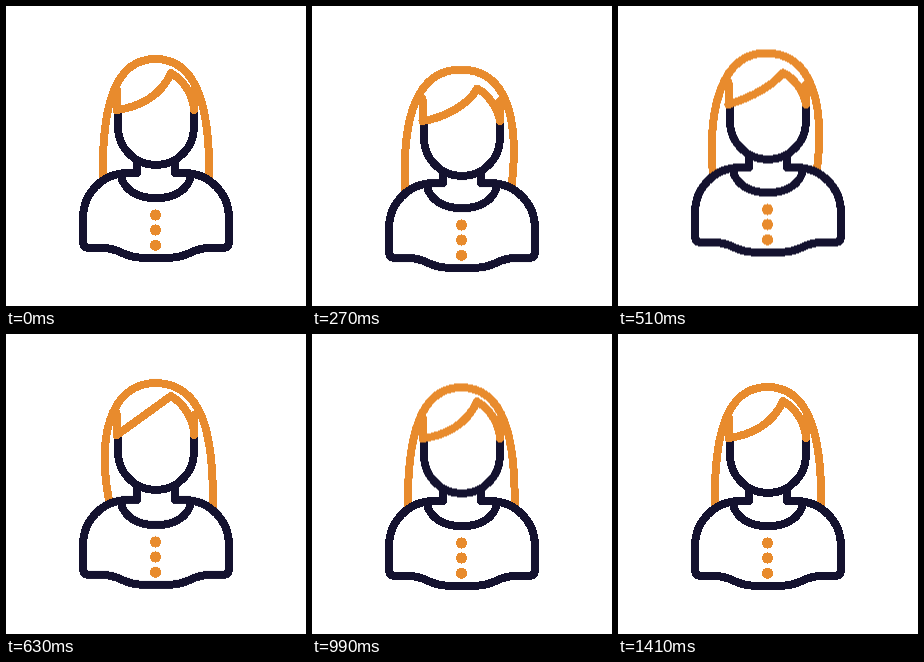
Write an HTML page without scripts that moves like this. It is 300 px wide and 300 px high and loops after 3950 ms.

```html
<!DOCTYPE html>
<html lang="en">
<head>
<meta charset="utf-8">
<title>Avatar bounce</title>
<style>
html, body { margin: 0; width: 100%; height: 100%; overflow: hidden; background: #fff; }
svg { display: block; width: 100%; height: 100%; shape-rendering: crispEdges; }
.dark, .warm { fill: none; stroke-width: 8; stroke-linecap: round; stroke-linejoin: round; }
.dark { stroke: #14122f; }
.warm { stroke: #e88b2d; }
.solid { fill: #fff; }
.buttons { fill: #e88b2d; }

.body, .head, .strands, .fringe { animation: 3.95s ease-in-out infinite; }
.body { animation-name: bounce; }
.head { animation-name: lag; }
.strands { animation-name: sway; }
.fringe { animation-name: flop; }

@keyframes bounce {
  0%, 17.1%, 100% { transform: translateY(0); }
  4.8% { transform: translateY(12.1px); }
  13.4% { transform: translateY(-5.6px); }
}
@keyframes lag {
  0%, 4.2%, 12.9%, 27.3%, 100% { transform: translateY(0); }
  9.87% { transform: translateY(2.3px); }
  15.6% { transform: translateY(-2px); }
  20.5% { transform: translateY(2px); }
}
@keyframes sway {
  0%, 35.7%, 100% { d: path("M97 180C95 101 108 53 149.5 53C191 53 205 101 203 180"); }
  3.8% { d: path("M103 180C89 99 103 52 152 52C199 53 209 100 209 180"); }
  9.87% { d: path("M85 182C88 105 105 53 146 53C193 53 209 107 188 178"); }
  15.95% { d: path("M106 183C88 108 104 52 150 52C197 53 208 103 207 180"); }
  20.5% { d: path("M97.5 180C96 101 108 53 150 53C191 53 206 101 204.5 180"); }
  28.1% { d: path("M95 180C94 101 108 53 149 53C191 53 204 101 201.5 180"); }
}
@keyframes flop {
  0%, 20.5%, 100% { d: path("M111 104C133 101 155 90 165 67C177 74 187 88 188 104"); }
  3.8% { d: path("M111 104C132 97 156 78 165 63C177 70 187 88 188 104"); }
  9.87% { d: path("M110 104C130 105 157 98 165 80C174 82 184 93 188 104"); }
  15.95% { d: path("M111 104C129 91 147 78 165 65C177 72 188 88 188 104"); }
}
</style>
</head>
<body>
<svg viewBox="0 0 300 300">
  <g class="body">
    <g class="head">
      <path class="warm strands" d="M97 180C95 101 108 53 149.5 53C191 53 205 101 203 180"/>
    </g>
    <path class="dark solid" d="M131 148V167H122C95 167 77 189 77 212V235Q77 242 84 242H98C112 242 120 251.5 133 251.5H167C180 251.5 188 242 202 242H216Q223 242 223 235V212C223 189 205 167 178 167H169V148"/>
    <path class="dark" d="M115 169C119 200 181 200 185 169"/>
    <g class="buttons">
      <circle cx="149.5" cy="209" r="5.6"/>
      <circle cx="149.5" cy="224" r="5.6"/>
      <circle cx="149.5" cy="239.3" r="5.6"/>
    </g>
    <g class="head">
      <path class="dark solid" d="M112 104V121A38 38 0 0 0 188 121V104"/>
      <path class="warm" d="M110.5 104V82M188 104V84"/>
      <path class="warm fringe" d="M111 104C133 101 155 90 165 67C177 74 187 88 188 104"/>
    </g>
  </g>
</svg>
</body>
</html>
```
